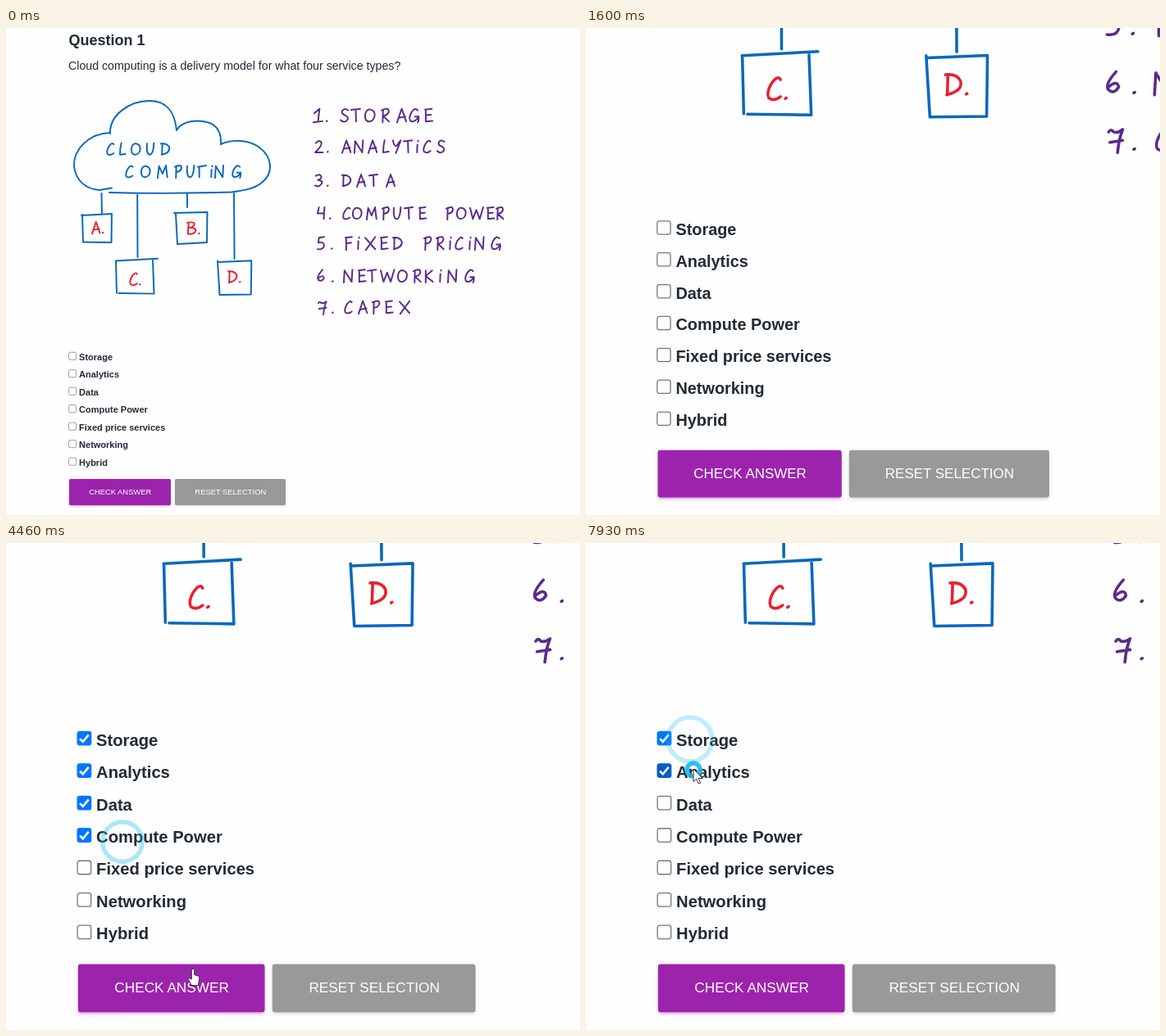
These frames come from a looping animation (700 px wide and 595 px high, 8000 ms). An HTML page:

```html
<!DOCTYPE html>
<html lang="en">
<head>
<meta charset="utf-8">
<title>Quiz question</title>
<style>
html, body { margin: 0; width: 100%; height: 100%; overflow: hidden; background: #fefefe; }
body { position: relative; font-family: "Liberation Sans", Arial, sans-serif; }
#page { position: absolute; left: 0; top: 0; width: 700px; height: 595px; transform-origin: 64px 594.6px; }
svg { position: absolute; left: 0; top: 0; width: 700px; height: 595px; overflow: visible; }
text { fill: #222a35; }
#ink { fill: none; stroke-width: 1.95; stroke-linecap: round; stroke-linejoin: round; }
.button {
  position: absolute; top: 550.7px; height: 32.4px; border-radius: 1.7px;
  font-size: 9.4px; line-height: 32.4px; text-align: center; color: #fff; white-space: nowrap;
  background: rgb(var(--tint));
  box-shadow: 0 1.6px 1.6px rgba(var(--tint), .14), 0 2.3px .8px -1.6px rgba(var(--tint), .2),
              0 .8px 4px rgba(var(--tint), .12);
}
.button::after {
  content: ""; position: absolute; inset: 0; border-radius: inherit; opacity: var(--lift, 0);
  box-shadow: 0 11px 20px -9px rgba(var(--tint), .42), 0 3px 18px rgba(0, 0, 0, .12),
              0 6px 8px -4px rgba(var(--tint), .2);
}
#check { left: 77.1px; width: 124.3px; --tint: 156, 36, 173; }
#reset { left: 206.2px; width: 135.2px; --tint: 153, 153, 153; }
</style>
</head>
<body>
<div id="page">
  <svg id="sheet">
    <text x="76.5" y="21" font-size="18" font-weight="bold">Question 1</text>
    <text x="76" y="51" font-size="14.2">Cloud computing is a delivery model for what four service types?</text>
    <g id="ink">
      <g stroke="#0668bd">
        <path d="M127 129C126 106 151 89 175 89C199 89 206 106 208 125C213 116 226 112 240 114C256 116 263 126 262 142"/>
        <path d="M262 142C275 136 296 136 309 146C324 157 327 176 313 188C304 196 293 198 275 200.500Q200 203 126 201"/>
        <path d="M127 128C100 129 82 149 83 169C85 187 98 197 114 198L129 195.500"/>
        <path d="M116.500 202L117 226M160.200 204L160.500 280M221 202V219M278 202L278.600 282"/>
        <path d="M92 229L129 227L128.500 262L94 261.500L93 228"/>
        <path d="M205 226L245.500 225L245 262L209 264L207 227"/>
        <path d="M133.800 284.500L185 281.700M179 284L180.500 324.600L137.500 324M134 284.500L135 323.700"/>
        <path d="M258.500 286L299.300 284.300L298.800 325.500L260.500 326L258 284.500"/>
      </g>
    </g>
  </svg>
  <div class="button" id="check">CHECK ANSWER</div>
  <div class="button" id="reset">RESET SELECTION</div>
</div>
<svg id="overlay">
  <g id="ripples" fill="none" stroke="#12b8f0"></g>
  <g id="cursor" fill="#fff" stroke="#333" stroke-width="1" stroke-linejoin="round">
    <path id="arrow" d="M0 0V15.500L3.700 12.300L6.200 18L8.600 17L6.100 11.500H11Z"/>
    <path id="hand" d="M-1.700 1.500Q0 -1 1.700 1.500V7.500L6.500 9Q8 9.700 7.800 12.500L6.300 20.500H-1.500L-5.500 13.500Q-5 10.500 -1.700 13Z"/>
  </g>
</svg>
<script>
const LOOP = 8000, ZOOM = 0.836, ZOOM_START = 781, ZOOM_TIME = 920, RIPPLE_TIME = 700, RESET = 6225;
const INK_WIDTH = 1.95;
const $ = id => document.getElementById(id);
const clamp = v => Math.min(1, Math.max(0, v));
const smooth = v => (v = clamp(v), v * v * (3 - 2 * v));

function add(parent, tag, attrs) {
  const node = document.createElementNS("http://www.w3.org/2000/svg", tag);
  for (const name in attrs) node.setAttribute(name, attrs[name]);
  return parent.appendChild(node);
}

// Handwritten letters, 18 units tall; "r" is a T with its stem at the left
const strokes = {
  A: "M0 18L6 0Q9 8 12 17M2 12L11 10.5",
  B: "M2 1L1 17M0 1Q11 -1 10 4Q8 8 3 8Q13 8 12 13Q9 18 1 17",
  C: "M10 2Q8 -2 3 5Q-1 12 1 16Q5 19 10 15",
  D: "M2 1L1.5 17M0 1Q9 0 12 6Q14 14 1 17",
  E: "M1 1V17M0 1L9 0M1 8.5L8 8M1 17L10 16",
  F: "M1 1V18M0 1L9 0M1 9L8 8",
  G: "M11 2Q7 -3 2 6Q-2 15 3 17Q9 17 12 10L7 10.5M12 10Q13 15 11 18",
  I: "M2 6L1.5 17M3 .5L2.8 1.5",
  K: "M1 1V18M10 1L1 9L11 17",
  L: "M2 0Q0 8 0 17L8 16",
  M: "M0 18L2 1L7 12L12 0L14 17",
  N: "M0 18L1 1L11 17L12 0",
  O: "M7 1C-1 -1 -3 17 5 17C14 17 16 1 6 1",
  P: "M2 1L1.5 18M0 2Q10 -3 9.5 4Q8 9 2 9.5",
  R: "M2 1L1.5 18M0 2Q10 -3 9.5 4Q8 9 2 9.5L10 17",
  S: "M10 2Q5 -2 2 3Q1 7 7 9Q12 12 8 16Q4 19 0 15",
  T: "M0 1.5L12 0M6 1L6.5 17",
  r: "M0 2L12 0M2 2V17",
  U: "M0 1Q-1 17 4 17Q9 17 10 0",
  W: "M0 1L4 17L9 4L14 17L19 0",
  X: "M0 1L14 17M14 0L1 18",
  Y: "M0 0Q1 8 5 8L10 1M11 0L4 18",
  1: "M1 6L8 0L6 17M0 18L12 16.5",
  2: "M1 4Q5 -2 9 3Q10 8 0 17H11",
  3: "M1 2Q7 -2 9 3Q9 7 4 8Q13 9 9 14Q5 19 0 16",
  4: "M2 0L0 9H9M10 0L9 17",
  5: "M9 0L2 1L1 8Q9 6 9 12Q8 18 0 17",
  6: "M7 0Q-2 10 1 14Q5 18 9 12Q8 6 1 12",
  7: "M0 3Q2 0 4 3Q7 4 11 1Q8 8 7 19M1 11L11 9.5",
  ".": "M0 16.5L.8 16"
};

function write(color, top, scale, letters, xs) {
  const line = add($("ink"), "g", { stroke: color, "stroke-width": INK_WIDTH / scale });
  [...letters].forEach((letter, i) => add(line, "path", {
    d: strokes[letter], transform: `translate(${xs[i] + INK_WIDTH / 2} ${top}) scale(${scale})`
  }));
}

const purple = "#5a2a8c", blue = "#0668bd", red = "#e8202f";
write(purple, 98.7, .92, "1.STORAGE", [374, 390, 407, 420, 437, 457, 476, 491, 510]);
write(purple, 137.3, .86, "2.ANALYTICS", [376, 391, 409, 424, 441, 459, 471, 484, 499, 508, 525]);
write(purple, 179, .84, "3.DATA", [376, 391, 409, 427, 442, 463]);
write(purple, 219, .84, "4.COMPUTEPOWER", [379, 394, 410, 422, 439, 458, 472, 485, 503, 536, 549, 565, 586, 597]);
write(purple, 255.3, .88, "5.FIXEDPRICING", [379, 396, 413, 427, 437, 456, 471, 509, 524, 539, 547, 563, 571, 591]);
write(purple, 295.3, .87, "6.NETWORKING", [379, 397, 411, 429, 440, 456, 477, 496, 510, 527, 538, 559]);
write(purple, 333.5, .87, "7.CAPEX", [380, 397, 412, 429, 446, 462, 479]);
write(blue, 140.5, .84, "CLOUD", [122, 138, 152, 171, 188]);
write(blue, 168, .84, "COMPUrING", [145, 164, 184, 205, 220, 233, 248, 254, 275]);
write(red, 237, .8, "A.", [104, 117]);
write(red, 237, .86, "B.", [220, 234]);
write(red, 299, .88, "C.", [150, 162]);
write(red, 296.5, .85, "D.", [270, 284]);

const rows = ["Storage", "Analytics", "Data", "Compute Power", "Fixed price services", "Networking", "Hybrid"]
  .map((label, i) => {
    const row = add($("sheet"), "g", { transform: `translate(76.2 ${395.8 + i * 21.5})` });
    add(row, "text", { x: 12.9, y: 9.8, "font-size": 11, "font-weight": "bold" }).textContent = label;
    return {
      box: add(row, "rect", { x: .4, y: .4, width: 9, height: 9, rx: 1.4, "stroke-width": .7 }),
      tick: add(row, "path", { d: "M2 5.2L4 7.2L7.8 2.6", fill: "none", stroke: "#fff", "stroke-width": 1.4 })
    };
  });

const clicks = [
  { at: 2330, x: 134, y: 246, row: 0 },
  { at: 2945, x: 136, y: 275, row: 1 },
  { at: 3480, x: 135, y: 321, row: 2 },
  { at: 4180, x: 142, y: 365, row: 3 },
  { at: 4780, x: 236, y: 541 },
  { at: RESET, x: 397, y: 545 },
  { at: 7594, x: 127, y: 240, row: 0 },
  { at: 7895, x: 131, y: 277, row: 1 }
];
clicks.forEach(c => c.ring = add($("ripples"), "circle", { cx: c.x, cy: c.y, "stroke-width": 5.5 }));

// Cursor stops: arrive, leave, x, y
const stops = [
  [1950, 1950, 37, 420], [2280, 2500, 134, 246], [2840, 3010, 136, 275], [3230, 3600, 134, 319],
  [3950, 4185, 142, 365], [4440, 4480, 228, 520], [4700, 5730, 236, 541],
  [6120, 7330, 396, 545], [7560, 7640, 127, 240], [7860, LOOP, 131, 276]
];

function cursorAt(t) {
  const next = stops.findIndex(stop => t < stop[0]);
  if (next === 0) return null;
  const to = stops[next < 0 ? stops.length - 1 : next];
  const from = next < 0 ? to : stops[next - 1];
  const k = next < 0 ? 1 : smooth((t - from[1]) / (to[0] - from[1]));
  return { x: from[2] + (to[2] - from[2]) * k, y: from[3] + (to[3] - from[3]) * k };
}

const lift = (t, start, end) => smooth((t - start) / 200) - smooth((t - end) / 200);

function draw(t) {
  $("page").style.transform = `scale(${1 + ZOOM * smooth((t - ZOOM_START) / ZOOM_TIME)})`;

  const cursor = cursorAt(t);
  $("cursor").style.display = cursor ? "" : "none";
  if (cursor) {
    const onButton = cursor.y > 514;
    $("cursor").setAttribute("transform", `translate(${cursor.x} ${cursor.y})`);
    $("arrow").style.display = onButton ? "none" : "";
    $("hand").style.display = onButton ? "" : "none";
  }

  rows.forEach(({ box, tick }, i) => {
    const checked = clicks.some(c => c.row === i && c.at <= t && (c.at >= RESET || t < RESET));
    const hover = cursor && cursor.x > 86 && cursor.x < 200 && Math.abs(cursor.y - 240 - 39.45 * i) < 13;
    const accent = hover ? "#005cc8" : "#0075ff";
    box.setAttribute("fill", checked ? accent : "#fff");
    box.setAttribute("stroke", checked ? accent : hover ? "#4f4f4f" : "#767676");
    tick.style.display = checked ? "" : "none";
  });

  for (const { at, ring } of clicks) {
    const age = (t - at) / RIPPLE_TIME;
    const fade = age >= 0 && age < 1 ? (1 - age) ** 2 : 0;
    ring.setAttribute("r", 35 - 30 * fade);
    ring.setAttribute("opacity", fade);
  }

  $("check").style.setProperty("--lift", lift(t, 4450, RESET));
  $("reset").style.setProperty("--lift", lift(t, 5960, 7380));
}

const start = performance.now();
function frame() {
  draw((performance.now() - start) % LOOP);
  requestAnimationFrame(frame);
}
frame();
</script>
</body>
</html>
```
